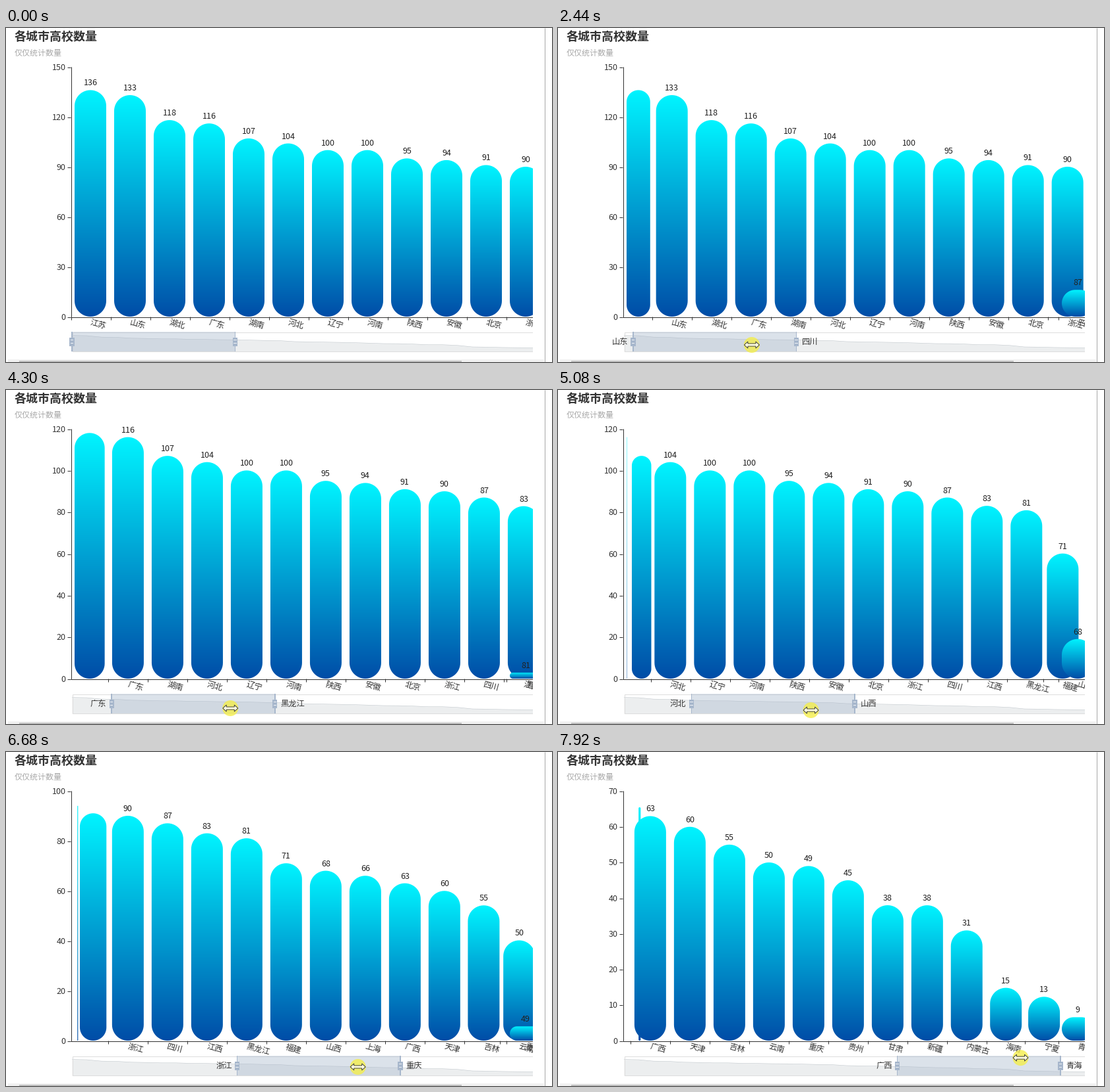
A matplotlib script that plays this animation: 828 px wide and 508 px high, repeating every 7.99 s.

```python
import math

import numpy as np
import matplotlib.pyplot as plt
from matplotlib.animation import FuncAnimation
from matplotlib.patches import Circle, Polygon, Rectangle
from matplotlib.path import Path

W, H, DPI = 828, 508, 64
STEP_MS, FRAMES = 34, 235
PX = 72 / DPI  # points per pixel

NAMES = ("江苏 山东 湖北 广东 湖南 河北 辽宁 河南 陕西 安徽 北京 浙江 四川 江西 黑龙江 "
         "福建 山西 上海 广西 天津 吉林 云南 重庆 贵州 甘肃 新疆 内蒙古 海南 宁夏 青海").split()
VALUES = np.array([136, 133, 118, 116, 107, 104, 100, 100, 95, 94, 91, 90, 87, 83, 81,
                   71, 68, 66, 63, 60, 55, 50, 49, 45, 38, 38, 31, 15, 13, 9])
IDX = np.arange(len(NAMES))

LEFT, BASE, GRID_W, GRID_H = 98, 439, 720, 380
BAR_TOP, BAR_END = "#00f4ff", "#004da7"
INK, BLUE = "#333333", "#a7b7cc"
SLIDE_X, SLIDE_Y, SLIDE_H, SPAN = 100, 462, 30, 247.5

# Window changes: time, first category, number of categories
WINDOWS = [(0, 0, 12), (2407, 1, 12), (3355, 2, 11), (3438, 2, 12)]
WINDOWS += [(t, k, 12) for k, t in enumerate(
    [4300, 4850, 5042, 5563, 5758, 5960, 6210, 6470, 6668,
     6860, 7020, 7170, 7310, 7460, 7590, 7730], start=3)]

# Time, slider handle x, cursor x, cursor y
DRAG = np.array([
    (510, 100, 405, 504), (1060, 100, 280, 482), (1500, 100, 280, 482),
    (1600, 102.5, 282.5, 482), (1800, 102.5, 282.5, 482), (2130, 109, 289, 482),
    (2290, 110.5, 290.5, 482), (2440, 114, 294, 482), (3450, 138, 318, 482),
    (4300, 160, 340, 484), (5080, 202, 383, 487), (5770, 255, 438, 487),
    (6680, 350, 533, 479), (7920, 516, 703, 465)])
ENTER_MS, PRESS_MS = 510, 1270
SETTLE_MS, REMOVE_MS = 95, 300


def nice_ticks(top):
    raw = top / 5
    power = 10 ** math.floor(math.log10(raw))
    ratio = raw / power
    nice = next((n for lim, n in ((1.5, 1), (2.5, 2), (4, 3), (7, 5)) if ratio < lim), 10)
    step = int(nice * power)
    return [step * i for i in range(math.ceil(top / step) + 1)]


def chart_state(t):
    """Band positions, bar heights and axis ticks at time t."""
    x, band, h = (np.zeros(len(IDX)) for _ in range(3))
    gone = np.full(len(IDX), -1e6)
    live = np.zeros(len(IDX), bool)
    ticks = {}
    past = [w for w in WINDOWS if w[0] <= t]
    ends = [w[0] for w in past[1:]] + [t]
    for (t0, first, count), t1 in zip(past, ends):
        now = (IDX >= first) & (IDX < first + count)
        new = now & ~live
        gone[live & ~now] = t0
        values = nice_ticks(VALUES[first])
        unit = GRID_H / values[-1]
        goal_band = GRID_W / count
        goal_x = LEFT + (IDX - first) * goal_band
        goal_h = VALUES * unit
        x[new], band[new] = goal_x[new], goal_band
        h[new] = goal_h[new] if t0 == 0 else 0

        age = (t1 - t0) / SETTLE_MS
        rest = math.exp(-age)
        grow = np.where(new, 2 ** -age, rest)
        x = np.where(now, goal_x + (x - goal_x) * rest, x)
        band = np.where(now, goal_band + (band - goal_band) * rest, band)
        h = np.where(now, goal_h + (h - goal_h) * grow, h)
        ticks = {v: v * unit + (ticks.get(v, v * unit) - v * unit) * rest for v in values}
        live = now
    shrink = np.clip(1 - (t - gone) / REMOVE_MS, 0, 1) ** 3
    width = 0.8 * band * np.where(live, 1, shrink)
    return x, band, h, width, live, ticks, first, first + count - 1


def capsule(x, y, w, h):
    r = min(w, h) / 2
    a = np.linspace(0, np.pi / 2, 14)
    corners = [(x + w - r, y + h - r), (x + r, y + h - r), (x + r, y + r), (x + w - r, y + r)]
    pts = [np.column_stack((cx + r * np.cos(a + i * np.pi / 2),
                            cy + r * np.sin(a + i * np.pi / 2)))
           for i, (cx, cy) in enumerate(corners)]
    return Path(np.vstack(pts))


plt.rcParams["font.family"] = ["Noto Sans CJK JP"]
plt.rcParams["toolbar"] = "None"
fig = plt.figure(figsize=(W / DPI, H / DPI), dpi=DPI, facecolor="white")
ax = fig.add_axes([0, 0, 1, 1])
ax.set_xlim(0, W)
ax.set_ylim(H, 0)
ax.axis("off")
ax.set_autoscale_on(False)


def text(x, y, s, size=12, color=INK, ha="left", z=4, **kw):
    return ax.text(x, y, s, fontsize=size * PX, color=color, ha=ha,
                   va="center_baseline", zorder=z, **kw)


def line(xs, ys, color=INK, width=1, z=1, **kw):
    return ax.plot(xs, ys, color=color, lw=width * PX, zorder=z,
                   solid_capstyle="butt", **kw)[0]


def box(x, y, w, h, color, z, **kw):
    return ax.add_patch(Rectangle((x, y), w, h, facecolor=color, lw=0, zorder=z, **kw))


# Titles and axes
text(13, 12, "各城市高校数量", 18, weight="bold")
text(13, 36.5, "仅仅统计数量", 12, "#aaaaaa")
line([LEFT + .5] * 2, [BASE - GRID_H, BASE + 1])
line([LEFT, LEFT + GRID_W], [BASE + .5] * 2)

y_ticks = {v: (line([93, 98], [0, 0]), text(90.5, 0, str(v), 12.5, ha="right"))
           for v in range(0, 151, 10)}

# One set of artists for each category
mix = np.linspace(0, 1, 256)[:, None, None]
rgb = [np.array([int(c[i:i + 2], 16) for i in (1, 3, 5)]) / 255 for c in (BAR_TOP, BAR_END)]
gradient = rgb[0] * (1 - mix) + rgb[1] * mix
bars, counts, labels, x_ticks = [], [], [], []
for i, name in enumerate(NAMES):
    bars.append(ax.imshow(gradient, extent=(0, 1, 1, 0), aspect="auto",
                          interpolation="nearest", zorder=2 + i * .01))
    counts.append(text(0, 0, str(VALUES[i]), 12.5, "#222222", "center"))
    labels.append(text(0, 446.5, name, 12.2, rotation=-15, rotation_mode="anchor"))
    x_ticks.append(line([0, 0], [BASE, BASE + 5]))
ax.set_xlim(0, W)
ax.set_ylim(H, 0)

# Slider
shadow = np.append(VALUES, [7, 6, 6])
span = shadow.max() - shadow.min()
shadow_x = SLIDE_X + GRID_W * np.arange(len(shadow)) / (len(shadow) - 1)
shadow_y = SLIDE_Y + SLIDE_H * (shadow.max() + .3 * span - shadow) / (1.6 * span)
ax.fill_between(shadow_x, shadow_y, SLIDE_Y + SLIDE_H, color="#2f4554", alpha=.09, lw=0, zorder=1)
line(shadow_x, shadow_y, "#2f4554", .6, alpha=.3)
ax.add_patch(Rectangle((SLIDE_X + .5, SLIDE_Y + .5), GRID_W, SLIDE_H - 1, fill=False,
                       edgecolor="#dddddd", lw=PX, zorder=1))
filler = box(0, SLIDE_Y, SPAN, SLIDE_H, BLUE, 3, alpha=.4)
grips = []
for side in (0, SPAN):
    for dx, dy, w, h, color in ((-.8, 0, 1.6, SLIDE_H, BLUE), (-3.7, 8.5, 7.4, 13, BLUE),
                                (-2.2, 12.1, 4.4, 1.2, "#eef1f5"),
                                (-2.2, 16.7, 4.4, 1.2, "#eef1f5")):
        grips.append((side + dx, box(0, SLIDE_Y + dy, w, h, color, 3.1)))
from_label = text(0, 476, "", 12.3, ha="right")
to_label = text(0, 476, "", 12.3)

# Cursor
RESIZE = np.array([(-11.5, 0), (-6, -5), (-6, -2), (6, -2), (6, -5),
                   (11.5, 0), (6, 5), (6, 2), (-6, 2), (-6, 5)])
POINTER = np.array([(0, 0), (0, 16), (4, 12.5), (6.5, 18), (9, 17), (6.5, 11.5), (11.5, 11.5)])
spot = ax.add_patch(Circle((0, 0), 12, facecolor="#f4ee4c", alpha=.8, lw=0, zorder=6))
cursor = ax.add_patch(Polygon(RESIZE, closed=True, facecolor="#fffde0",
                              edgecolor="#333333", lw=.9 * PX, zorder=7))

# Page edge and scroll bar
box(799, 0, W - 799, H, "white", 8)
box(3, 504, 813, 4, "#f1f1f1", 9)
box(20, 506, 671, 2, "#c1c1c1", 9)
line([816.5] * 2, [0, H], "#a8a8a8", z=9)


def draw_chart(t):
    x, band, h, width, live, ticks, first, last = chart_state(t)
    for i in IDX:
        shown = width[i] > .2 and h[i] > .5
        bars[i].set_visible(shown)
        if shown:
            x0, top = x[i] + .1 * band[i], BASE - h[i]
            bars[i].set_extent((x0 - 2, x0 + width[i] + 2, BASE, top))
            bars[i].set_clip_path(capsule(x0, top, width[i], h[i]), ax.transData)
        mid = x[i] + band[i] / 2
        counts[i].set_position((mid, BASE - h[i] - 12))
        labels[i].set_x(mid)
        x_ticks[i].set_xdata([x[i] + .5] * 2)
        for part in (counts[i], labels[i], x_ticks[i]):
            part.set_visible(bool(live[i]))
    for v, (mark, label) in y_ticks.items():
        mark.set_visible(v in ticks)
        label.set_visible(v in ticks)
        if v in ticks:
            y = BASE - ticks[v]
            mark.set_ydata([y + .5] * 2)
            label.set_y(y - .5)
    from_label.set_text(NAMES[first])
    to_label.set_text(NAMES[last])


def draw_slider(t):
    handle, cx, cy = (np.interp(t, DRAG[:, 0], DRAG[:, k]) for k in (1, 2, 3))
    filler.set_x(handle)
    for dx, part in grips:
        part.set_x(handle + dx)
    hover = t >= ENTER_MS and cy < SLIDE_Y + SLIDE_H
    from_label.set_x(handle - 8)
    to_label.set_x(handle + SPAN + 8.5)
    from_label.set_visible(hover)
    to_label.set_visible(hover)
    cursor.set_visible(t >= ENTER_MS)
    cursor.set_xy((RESIZE if hover else POINTER) + (cx, cy))
    spot.center = cx, cy
    spot.set_visible(t >= PRESS_MS)


def update(frame):
    t = frame * STEP_MS + 21
    draw_chart(t)
    draw_slider(t)
    return []


anim = FuncAnimation(fig, update, frames=FRAMES, interval=STEP_MS, repeat=True,
                     repeat_delay=0, blit=False)
plt.show()
```
